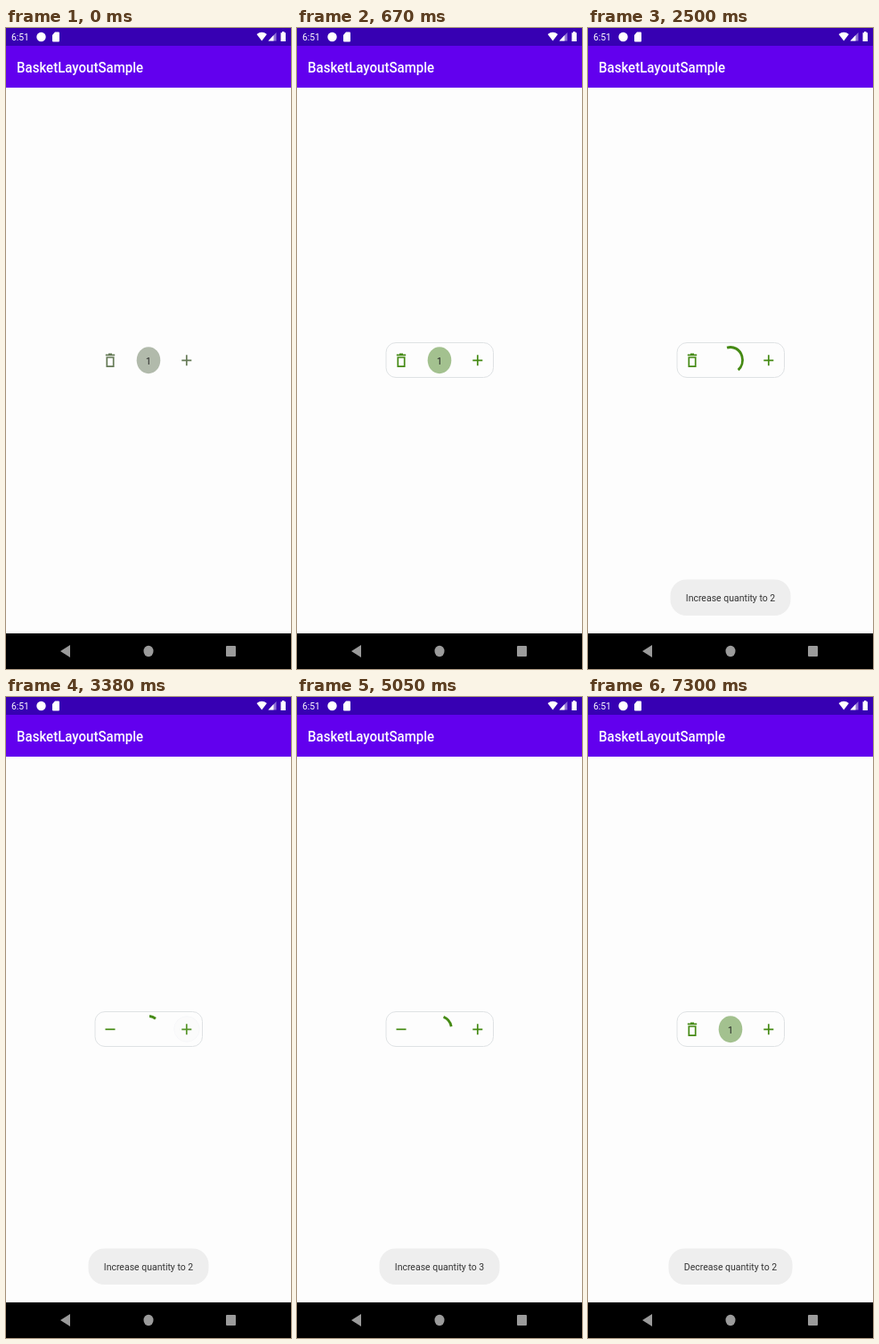
Write an HTML page that moves like this. It is 320 by 720 pixels and loops after 7.63 s.

```html
<!DOCTYPE html>
<html lang="en">
<head>
<meta charset="utf-8">
<title>BasketLayoutSample</title>
<style>
  html, body { margin: 0; width: 100%; height: 100%; overflow: hidden; background: #fdfdfd; }
  svg { display: block; font-family: Roboto, sans-serif; }
  .icon { fill: none; stroke: #458a14; stroke-width: 1.7; }
  .mid { text-anchor: middle; font-size: 11.8px; }
  .nav { fill: #9b9b9b; }
</style>
</head>
<body>
<svg width="320" height="720" viewBox="0 0 320 720">
  <rect width="320" height="720" fill="#fdfdfd"/>

  <rect width="320" height="67" fill="#6200ee"/>
  <rect width="320" height="20" fill="#3700b3"/>
  <g fill="#fff">
    <text transform="translate(6 14) scale(.89 1)" font-size="11.6">6:51</text>
    <text transform="translate(12 50) scale(.89 1)" font-size="16.9" font-weight="500">BasketLayoutSample</text>
    <circle cx="39.5" cy="10" r="5.2"/>
    <path d="M55 4.5h4q1 0 1 1v9q0 1-1 1h-6q-1 0-1-1V8z"/>
    <path d="M281.500 7q5.700-4.500 11.400 0L287.200 14.500z"/>
    <path d="M303.500 5v9.500h-9z" fill-opacity=".45"/>
    <path d="M300.500 8v6.500h-6z"/>
    <path d="M310 4h2.500v1.300h1.500v9.700h-5.500V5.300h1.500z"/>
  </g>

  <rect y="680" width="320" height="40"/>
  <path class="nav" d="M61 700l11-7v14z"/>
  <ellipse class="nav" cx="160" cy="700" rx="5.500" ry="6.200"/>
  <rect class="nav" x="247" y="694" width="11" height="12" rx="1"/>

  <g id="basket">
    <rect id="frame" x="100" y="353.500" width="120.500" height="39" rx="11" fill="#fdfdfd" stroke="#dfe2e4"/>
    <circle id="ripple" cy="373" fill="#f4f4f6" stroke="#d3d6e2" stroke-width=".8"/>
    <g class="icon" id="left">
      <path id="trash" d="M111.800 367.300h10.400M115 366.300h4M113.300 370v10.200h7.400V370z"/>
      <path id="minus" d="M111.500 373.300h11"/>
    </g>
    <path class="icon" id="plus" d="M197.300 373.300h11M202.800 367.300v12"/>
    <g id="badge">
      <ellipse cx="160" cy="373.200" rx="13.300" ry="15" fill="#a3c18f"/>
      <text id="count" class="mid" transform="translate(160 377.500) scale(.89 1)" fill="#222"></text>
    </g>
    <g transform="translate(160 373) scale(.93 1)">
      <circle id="spinner" r="14.500" pathLength="360" fill="none" stroke="#458a14" stroke-width="3"/>
    </g>
  </g>
  <g id="toasts"></g>
</svg>
<script>
const LOOP = 7630;
const $ = id => document.getElementById(id);
const ramp = (t, from, length) => Math.min(1, Math.max(0, (t - from) / length));
const show = (id, on) => $(id).setAttribute('visibility', on ? 'visible' : 'hidden');

// Each tap shows a ripple, then a spinner for LOADING ms, then the new quantity.
const LOADING = 1000;
const RIPPLE = 300;
const taps = [
  { at: 1453, load: 1613, button: 'plus', count: 2 },
  { at: 3134, load: 3294, button: 'plus', count: 3 },
  { at: 4750, load: 4910, button: 'left', count: 2 },
  { at: 5935, load: 6095, button: 'left', count: 1 }
];
const rippleX = { left: 114, plus: 203 };
const toasts = [
  { text: 'Increase quantity to 2', from: 2140, to: 4000, width: 135 },
  { text: 'Increase quantity to 3', from: 4020, to: 5880, width: 135 },
  { text: 'Decrease quantity to 2', from: 5890, to: LOOP, width: 139 }
];
$('toasts').innerHTML = toasts.map(({ text, width }) => `<g>
  <rect x="${160 - width / 2}" y="619.500" width="${width}" height="40.500" rx="18" fill="#eeeeee"/>
  <text class="mid" transform="translate(160 644) scale(.89 1)" fill="#333">${text}</text></g>`).join('');

// cubic-bezier(.4, 0, .2, 1)
function ease(x) {
  let low = 0, high = 1, s = .5;
  for (let i = 0; i < 20; i++) {
    s = (low + high) / 2;
    const bx = 1.2 * s * (1 - s) ** 2 + .6 * s * s * (1 - s) + s ** 3;
    if (bx < x) low = s; else high = s;
  }
  return 3 * s * s * (1 - s) + s ** 3;
}

function drawSpinner(t) {
  const turn = 1520 * t / 5400;
  const head = turn + 250 * ease(ramp(t, 0, 667));
  const tail = turn - 20 + 250 * ease(ramp(t, 667, 667));
  $('spinner').setAttribute('transform', `rotate(${tail - 90})`);
  $('spinner').setAttribute('stroke-dasharray', `${head - tail} 360`);
}

function draw(t) {
  const settle = ramp(t, 50, 150);
  $('frame').setAttribute('opacity', settle);
  $('basket').style.filter = settle < 1 ? `grayscale(${.7 * (1 - settle)})` : 'none';

  const loading = taps.find(({ load }) => t >= load && t < load + LOADING);
  const count = taps.reduce((n, tap) => t >= tap.load + LOADING ? tap.count : n, 1);
  show('spinner', loading);
  show('badge', !loading);
  show('trash', count === 1);
  show('minus', count > 1);
  $('count').textContent = count;
  if (loading) drawSpinner(t - loading.load);

  const tap = taps.find(({ at }) => t >= at && t < at + RIPPLE);
  const age = tap ? (t - tap.at) / RIPPLE : 1;
  show('ripple', tap);
  $('ripple').setAttribute('cx', tap ? rippleX[tap.button] : 0);
  $('ripple').setAttribute('r', 8.5 + 7 * age);
  $('ripple').setAttribute('opacity', 1 - age);
  for (const id of ['left', 'plus'])
    $(id).setAttribute('opacity', tap && tap.button === id ? .5 + .5 * age : 1);

  toasts.forEach(({ from, to }, i) => {
    $('toasts').children[i].setAttribute('opacity', ramp(t, from, 160) * (1 - ramp(t, to, 120)));
  });
}

const begin = performance.now();
function tick() {
  draw((performance.now() - begin) % LOOP);
  requestAnimationFrame(tick);
}
tick();
</script>
</body>
</html>
```
